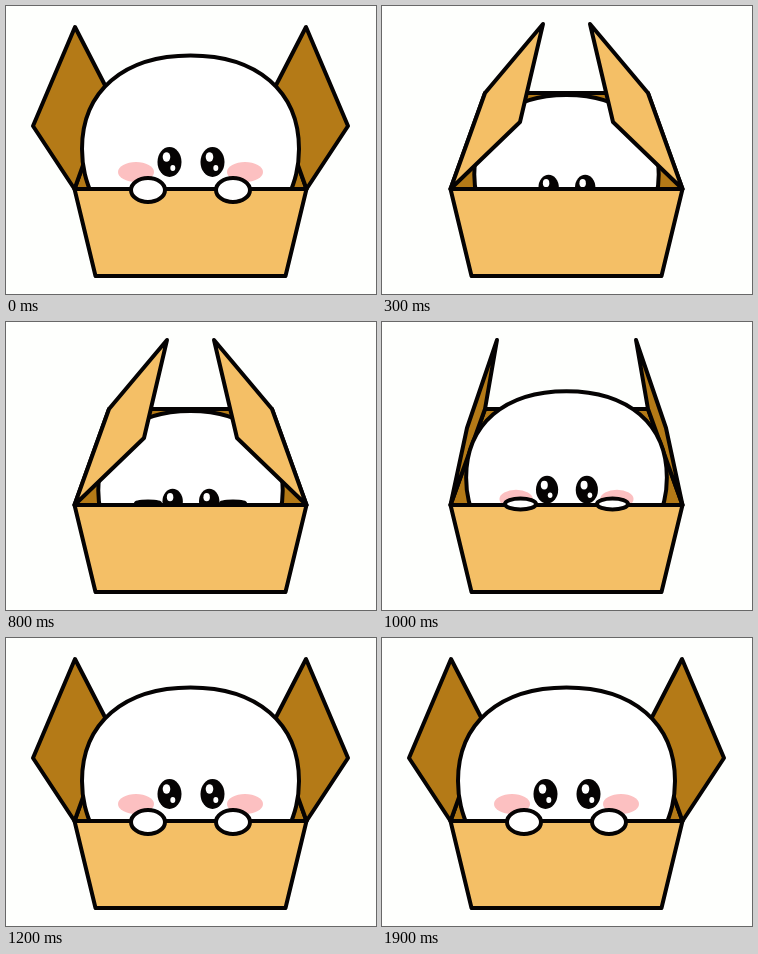
Animation of 370x288 px, one loop 2 s. Source, as an HTML page with a canvas:

```html
<!DOCTYPE html>
<html lang="en">
<head>
<meta charset="utf-8">
<title>Peekaboo box</title>
<style>
html, body { margin: 0; width: 100%; height: 100%; overflow: hidden; background: #fefffd; }
canvas { display: block; width: 370px; height: 288px; }
</style>
</head>
<body>
<canvas id="stage" width="370" height="288"></canvas>
<script>
const ctx = document.getElementById('stage').getContext('2d');
const LOOP = 2000, STEP = 100, MID = 184.5;
const INK = '#050303', CARD = '#f4bf66', INSIDE = '#b47a17', BLUSH = '#fcc0c1';

// Closing amount per step: 0 is wide open, 4 is shut; open for the rest of the loop.
const CLOSING = [0, 0.67, 1.33, 2, 3, 4, 4, 3, 2, 1.5, 1, 0.5];

// Flap per pose: outer front corner x, y, then outer back corner x, y.
const FLAP = [
  [27, 120, 69, 21],
  [85, 106, 115, 18],
  [138, 116, 161, 18],
  [172, 150, 177, 50],
  [184, 183, 184, 87]
];

// Left paw per pose: x, y, rx, ry.
const PAW = [
  [142, 184, 17, 12],
  [138.5, 182, 15.5, 5.5],
  [142, 181, 12, 1.5]
];

function blend(poses, p) {
  const i = Math.min(Math.floor(p), poses.length - 2);
  return poses[i].map((v, k) => v + (poses[i + 1][k] - v) * (p - i));
}

function paint(fill, width = 4) {
  if (fill) {
    ctx.fillStyle = fill;
    ctx.fill();
  }
  if (width) {
    ctx.lineWidth = width;
    ctx.strokeStyle = INK;
    ctx.stroke();
  }
}

function polygon(points, fill) {
  ctx.beginPath();
  points.forEach(([x, y]) => ctx.lineTo(x, y));
  ctx.closePath();
  paint(fill);
}

function oval(x, y, rx, ry, fill, width = 0) {
  ctx.beginPath();
  ctx.ellipse(x, y, rx, ry, 0, 0, Math.PI * 2);
  paint(fill, width);
}

function mirrored(draw) {
  draw();
  ctx.save();
  ctx.translate(MID * 2, 0);
  ctx.scale(-1, 1);
  draw();
  ctx.restore();
}

function drawFlaps(p) {
  const [fx, fy, bx, by] = blend(FLAP, p);
  const fill = p < 1.25 ? INSIDE : CARD;
  mirrored(() => polygon([[68.5, 183], [fx, fy], [bx, by], [103, 87]], fill));
}

function drawHead(p, sink) {
  const s = 1 - 0.075 * p;
  const top = 49.5 + 19.7 * p;
  const X = x => MID + (x - MID) * s;
  const Y = y => top + (y - 49.5) * s;
  const half = (side) => {
    const x = v => X(side < 0 ? v : 2 * MID - v);
    return { x };
  };
  const l = half(-1).x, r = half(1).x;

  ctx.beginPath();
  ctx.moveTo(l(87), Y(192));
  ctx.bezierCurveTo(l(80), Y(175), l(76), Y(162), l(76), Y(143));
  ctx.bezierCurveTo(l(76), Y(85), l(118), Y(49.5), MID, top);
  ctx.bezierCurveTo(r(118), Y(49.5), r(76), Y(85), r(76), Y(143));
  ctx.bezierCurveTo(r(76), Y(162), r(80), Y(175), r(87), Y(192));
  paint('#fff');

  if (p < 1.9) {
    mirrored(() => oval(X(130), Y(166), 18 * s, 10 * s, BLUSH));
  }
  const y = Y(156) + sink;
  for (const x of [X(163.5), X(206.5)]) {
    oval(x, y, 12 * s, 15 * s, INK);
    oval(x - 3 * s, y - 5 * s, 3.8 * s, 4.8 * s, '#fff');
    oval(x + 3.3 * s, y + 6 * s, 2.5 * s, 3 * s, '#fff');
  }
}

function draw(time) {
  const step = Math.floor((time % LOOP) / STEP);
  const p = CLOSING[step] || 0;
  const goingDown = step < 6;

  ctx.fillStyle = '#fefffd';
  ctx.fillRect(0, 0, 370, 288);
  ctx.lineJoin = 'round';

  polygon([[68.5, 183], [103, 87], [266, 87], [300.5, 183]], INSIDE);
  const flapsBehind = p < 1.25;
  if (flapsBehind) drawFlaps(p);
  drawHead(p, goingDown ? p : 0);
  if (!flapsBehind) drawFlaps(p);
  polygon([[68.5, 183], [300.5, 183], [279.5, 270], [89.5, 270]], CARD);

  if (p < 2 || (p === 2 && !goingDown)) {
    const paw = blend(PAW, p);
    mirrored(() => oval(...paw, '#fff', 4));
  }
}

const start = performance.now();
function tick() {
  draw(performance.now() - start);
  requestAnimationFrame(tick);
}
tick();
</script>
</body>
</html>
```
